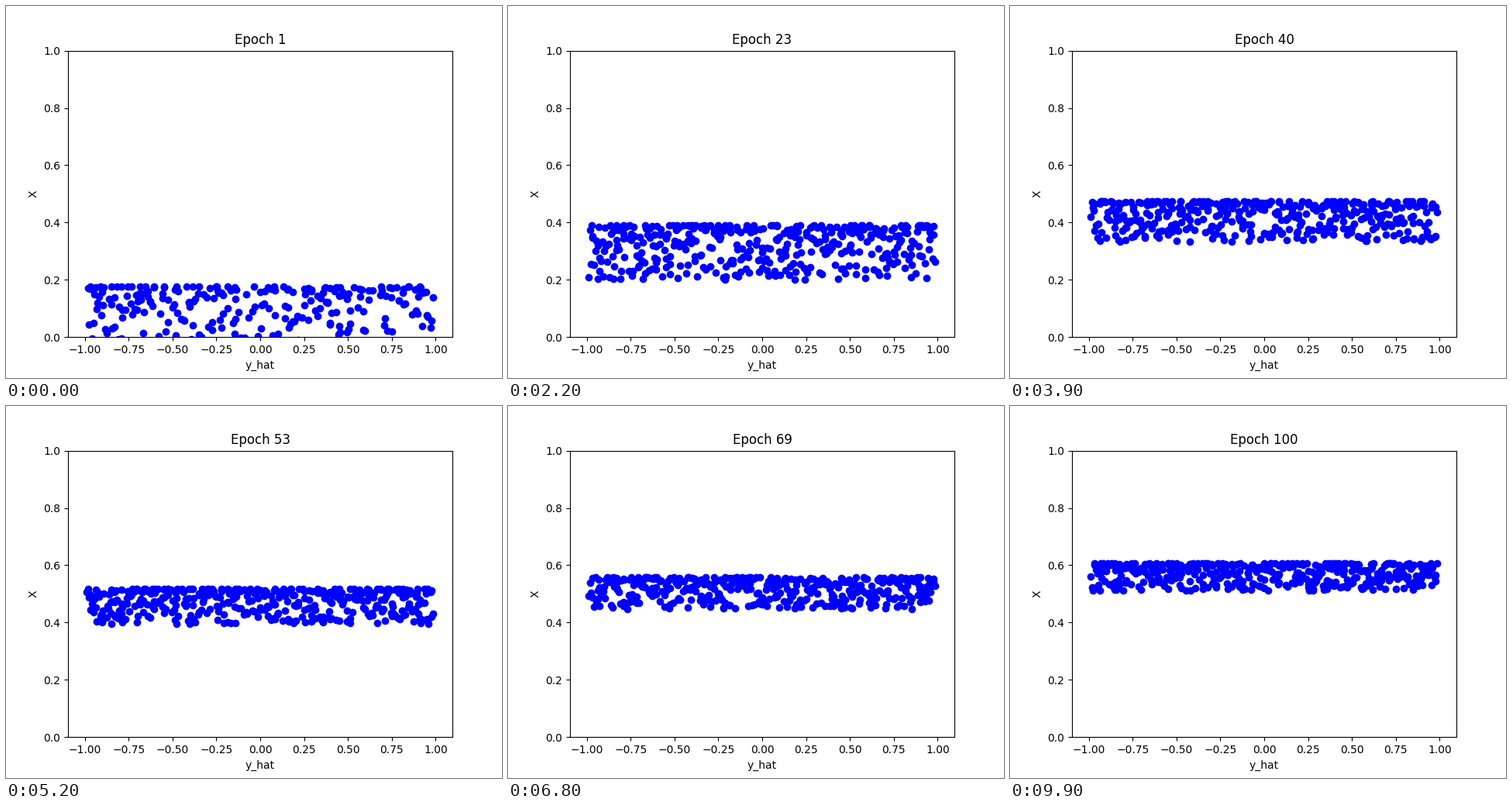
Write a matplotlib script that moves like this. It is 640 px wide and 480 px high and loops after 10 s.

```python
import matplotlib.pyplot as plt
import numpy as np
from matplotlib.animation import FuncAnimation

EPOCHS = 100
POINTS = 400

rng = np.random.default_rng(12)
x = np.linspace(-0.985, 0.985, POINTS) + rng.uniform(-0.011, 0.011, POINTS)

# 0 at the band's upper edge, 1 at the lower; crowded towards the top
u = np.linspace(0, 1, POINTS)
depth = (np.sin(u) / np.sin(1)) ** 2


def rise(epoch, limit, gain, delay):
    """Value that climbs towards its limit ever more slowly."""
    return limit - gain / (epoch + delay)


def predict(epoch):
    top = rise(epoch, 0.781, 24.15, 39)
    bottom = rise(epoch, 0.700, 23.41, 23.85)
    # predictions land on the samples in a new order every epoch
    order = np.random.default_rng(epoch).permutation(POINTS)
    return top - (top - bottom) * depth[order]


fig, ax = plt.subplots(figsize=(6.4, 4.8), dpi=100)
dots = ax.scatter(x, predict(1), color="blue")
ax.set_xlim(-1.0955, 1.0955)
ax.set_ylim(0, 1)
ax.set_xlabel("y_hat")
ax.set_ylabel("X")
title = ax.set_title("Epoch 1")


def update(i):
    epoch = i + 1
    dots.set_offsets(np.column_stack([x, predict(epoch)]))
    title.set_text(f"Epoch {epoch}")
    return dots, title


anim = FuncAnimation(fig, update, frames=EPOCHS, interval=100, repeat=True,
                     repeat_delay=0, blit=False)
plt.show()
```
